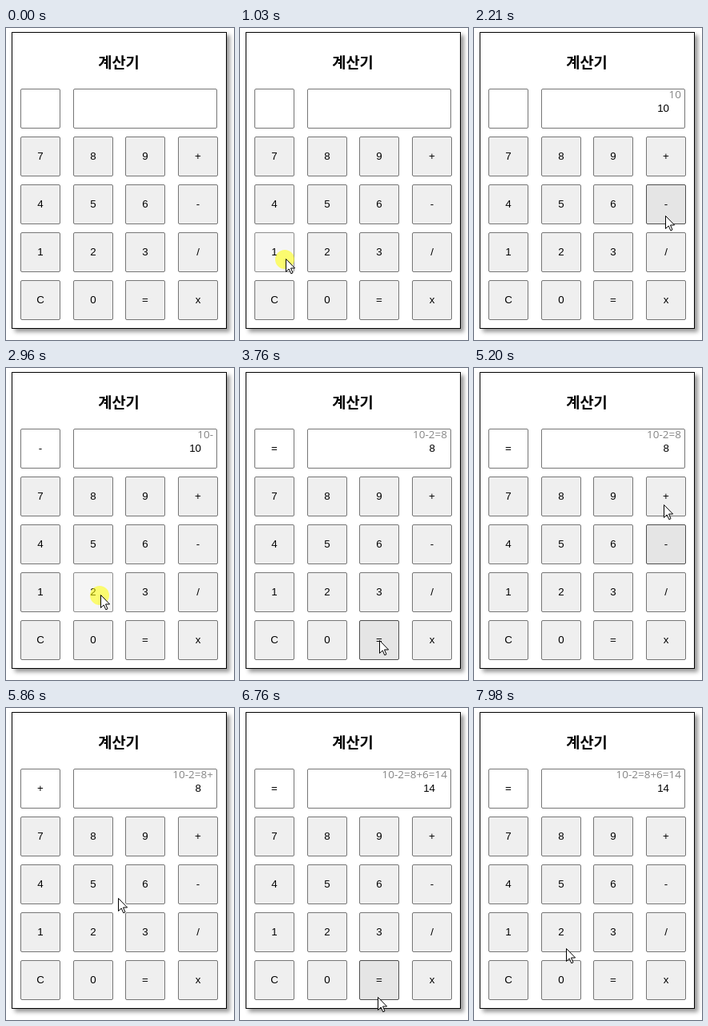
Animation of 285 by 391 pixels, one loop 8 s. Source, as an HTML page:

```html
<!DOCTYPE html>
<html lang="ko">
<head>
<meta charset="utf-8">
<title>계산기</title>
<style>
  html, body { margin: 0; width: 100%; height: 100%; overflow: hidden; background: #fff; }
  body { position: relative; }
  div { position: absolute; box-sizing: border-box; font: 13.333px/47px "Liberation Sans", Arial, sans-serif; }
  .panel {
    left: 7px; top: 5px; width: 269px; height: 372px;
    border: 1px solid #000; background: #fff; box-shadow: 4px 4px 5px #999;
  }
  .title {
    left: 0; top: 28px; width: 282px; text-align: center;
    font: bold 18.72px/27px "Noto Sans CJK KR", "Noto Sans CJK", sans-serif;
  }
  .box {
    width: 50px; height: 50px; border: 1px solid #767676; border-radius: 2px;
    background: #fff; text-align: center; white-space: pre;
  }
  #op { left: 18px; top: 76px; }
  #value { left: 84px; top: 76px; width: 180px; padding-right: 19px; text-align: right; }
  #log {
    right: 26px; top: 74px; width: 170px; text-align: right; color: #858585;
    font: 13.5px/19px "Open Sans", "Noto Sans", sans-serif;
  }
  .key { background: #efefef; }
  .hover { background: #e5e5e5; border-color: #4f4f4f; }
  .down { background: #f5f5f5; border-color: #8d8d8d; }
  #stage { left: 0; top: 0; width: 285px; height: 391px; }
  svg { position: absolute; left: 0; top: 0; }
</style>
</head>
<body>
<div id="stage">
  <div class="panel"></div>
  <div class="title">계산기</div>
  <div class="box" id="op"></div>
  <div class="box" id="value"></div>
  <div id="log"></div>
  <svg width="285" height="391" style="z-index:1">
    <g id="cursor">
      <circle id="halo" r="12" cx="-1" cy="1" fill="#ff0" fill-opacity=".55"/>
      <path d="M.5 .5V16.5L4.2 13 6.8 18.8 9 17.8 6.5 12H11.6Z" fill="#fff" stroke="#000"/>
    </g>
  </svg>
</div>
<script>
const LOOP = 8000, PRESS = 80, HOVER_LAG = 60, SIZE = 50;
const $ = id => document.getElementById(id);

// Pointer moves, with an optional click once it has arrived.
const entry = { x: 268, y: 392 };
const moves = [
  { from: 70, to: 870, x: 57, y: 289, click: 1000 },
  { from: 1080, to: 1250, x: 118, y: 349, click: 1480 },
  { from: 1710, to: 2210, x: 239, y: 235, click: 2400 },
  { from: 2570, to: 2780, x: 118, y: 284, click: 2960 },
  { from: 3040, to: 3200, x: 174, y: 341, click: 3350 },
  { from: 3760, to: 4160, x: 206, y: 275 },
  { from: 4160, to: 4550, x: 186, y: 217 },
  { from: 4580, to: 4930, x: 232, y: 224 },
  { from: 5080, to: 5230, x: 237, y: 165, click: 5290 },
  { from: 5400, to: 5640, x: 190, y: 285 },
  { from: 5640, to: 5860, x: 140, y: 238 },
  { from: 5890, to: 6080, x: 168, y: 225, click: 6100 },
  { from: 6180, to: 6440, x: 172, y: 364, click: 6590 },
  { from: 6670, to: 7070, x: 174, y: 349 },
  { from: 7400, to: 8300, x: 91, y: 281 }
];

const keys = [..."789+456-123/C0=x"].map((label, i) => {
  const x = Math.round(18 + 65.6 * (i % 4)), y = 136 + 60 * (i >> 2);
  const el = document.createElement("div");
  el.textContent = label;
  el.style.cssText = `left:${x}px;top:${y}px`;
  $("stage").append(el);
  return { el, label, x, y };
});

const hit = (k, p) => p.x >= k.x && p.x < k.x + SIZE && p.y >= k.y && p.y < k.y + SIZE;

function pointer(t) {
  const i = moves.filter(m => m.from <= t).length - 1;
  if (i < 0) return entry;
  const a = moves[i - 1] || entry, b = moves[i];
  const u = Math.min((t - b.from) / (b.to - b.from), 1), e = u * u * (3 - 2 * u);
  return { x: a.x + (b.x - a.x) * e, y: a.y + (b.y - a.y) * e };
}

const compute = {
  "+": (a, b) => a + b, "-": (a, b) => a - b,
  "x": (a, b) => a * b, "/": (a, b) => a / b
};

// One key press turns the calculator's state into the next one.
function press(s, key) {
  if (/\d/.test(key)) {
    return { ...s, value: s.fresh ? key : s.value + key, log: s.log + key, fresh: false };
  }
  if (key === "=") {
    const value = String(compute[s.op](s.left, +s.value));
    return { ...s, op: key, value, log: s.log + key + value, fresh: true };
  }
  return { ...s, op: key, left: +s.value, log: s.log + key, fresh: true };
}

const clicks = moves.filter(m => m.click);
const states = [{ op: "", value: "", log: "", left: 0, fresh: true }];
clicks.forEach((m, i) => states.push(press(states[i], keys.find(k => hit(k, m)).label)));

function draw(t) {
  const p = pointer(t), late = pointer(t - HOVER_LAG);
  const pressed = clicks.some(m => t >= m.click && t < m.click + PRESS);
  const state = states[clicks.filter(m => t >= m.click + PRESS).length];

  for (const k of keys) {
    k.el.className = "box key" + (hit(k, late) ? (pressed ? " down" : " hover") : "");
  }
  for (const id of ["op", "value", "log"]) $(id).textContent = state[id];
  $("halo").style.display = pressed ? "" : "none";
  $("cursor").setAttribute("transform", `translate(${Math.round(p.x)} ${Math.round(p.y)})`);
}

const start = performance.now();
function tick() {
  draw((performance.now() - start) % LOOP);
  requestAnimationFrame(tick);
}
tick();
</script>
</body>
</html>
```
